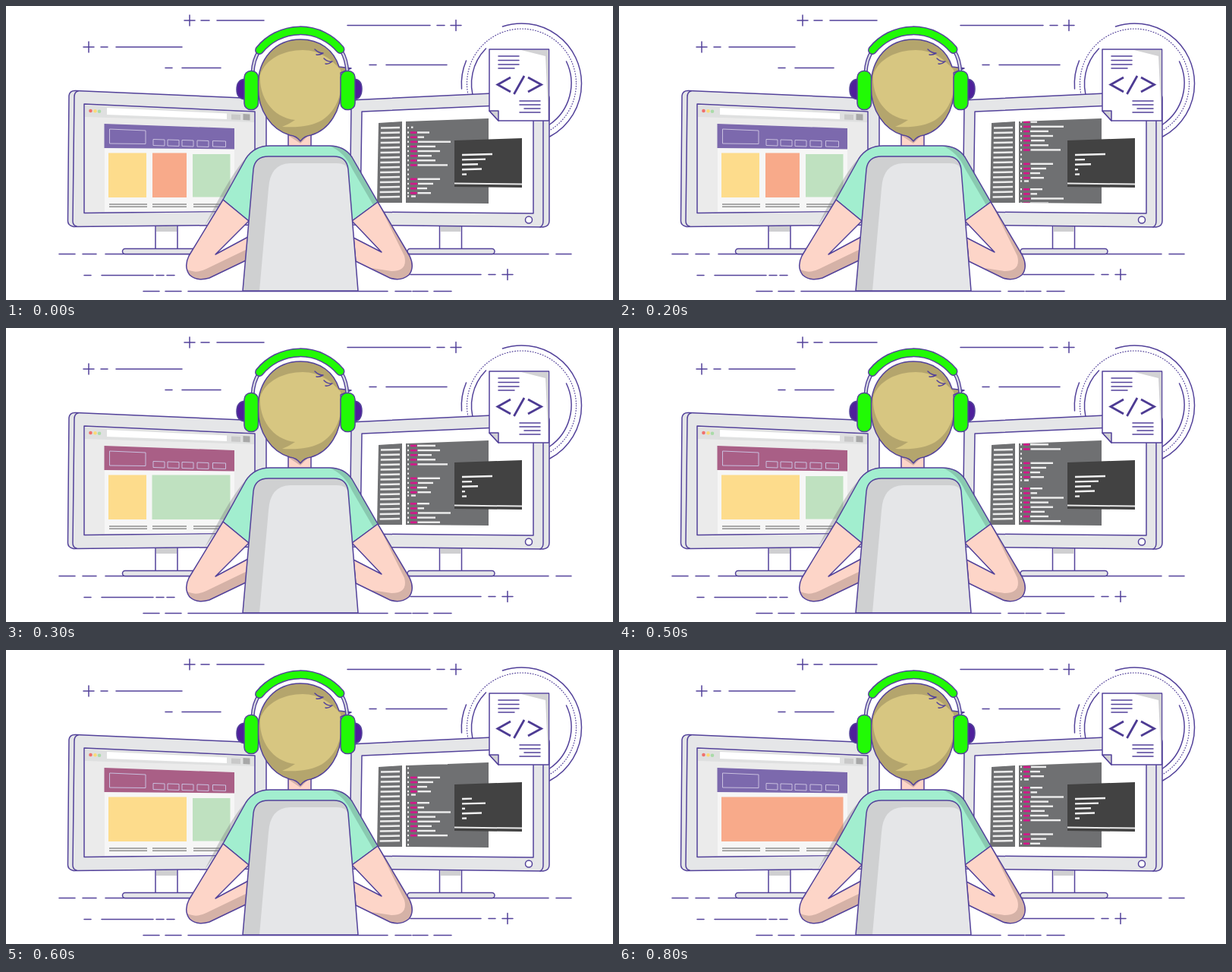
These frames come from a looping animation (800x387 px, 0.9 s). An HTML page:

```html
<!DOCTYPE html>
<html lang="en">
<head>
<meta charset="utf-8">
<title>Developer at work</title>
<style>
html, body { margin: 0; width: 100%; height: 100%; overflow: hidden; background: #fff; }
svg { display: block; width: 100%; height: 100%; }
.ink { stroke: #53429a; stroke-width: 1.5; stroke-linejoin: round; stroke-linecap: round; }
.none { fill: none; }
.metal { fill: #e5e6e8; }
.white { fill: #fff; }
.shadow { fill: #cfcfd1; }
.skin { fill: #fdd5c8; }
.skinShade { fill: #d5b2a7; }
.shirt { fill: #a2eecf; }
.shirtShade { fill: #89c9b0; }
.green { fill: #21fa05; }
</style>
</head>
<body>
<svg viewBox="0 0 800 387">
  <defs>
    <clipPath id="codeClip"><path d="M527 152L636 148V260L527 259Z"/></clipPath>
    <clipPath id="headClip"><path id="head" d="M332 106C332 68 356 44 388 44C414 44 432 58 439 80L455 82L441 88Q442 97 442 106C442 138 426 163 402 170Q393 171 388 178Q383 171 374 170C350 163 332 138 332 106Z"/></clipPath>
    <clipPath id="leftArm"><path id="armL" d="M286 255L241 329Q234 343 242 354Q252 363 268 358L316 335L319 304L276 327L320 283Z"/></clipPath>
    <clipPath id="rightArm"><path id="armR" d="M490 258L532 329Q539 344 531 354Q520 363 506 358L461 336L458 305L495 324L456 283Z"/></clipPath>
  </defs>

  <!-- Backdrop strokes -->
  <path class="ink none" d="
    M235 19h14M242 12v14M257 19h11M278 19h62
    M102 54h14M109 47v14M125 54h9M145 54h87
    M210 81.500h9M232 81.500h51
    M450 25.500h109M568 25.500h10M586 25.500h14M593 18.500v14
    M479 77.500h9M501 77.500h80
    M70 326.500h21M101 326.500h18M131 326.500h584M725 326.500h20
    M103 354.500h9M126 354.500h68M198 354.500h10M212 354.500h10
    M533 353.500h93M636 353.500h9M654 353.500h14M661 346.500v14
    M181 375.500h21M210 375.500h21M240 375.500h263M513 375.500h21M536 375.500h20M564 375.500h23"/>
  <g class="ink none" transform="translate(.5 1)">
    <path d="M654 26A79 79 0 0 1 758 101A79 79 0 0 1 716 171M600 108A79 79 0 0 1 606 71"/>
    <path d="M617 124A66 66 0 0 1 632 55M738 72A66 66 0 0 1 716 155"/>
    <circle cx="679" cy="101" r="72" stroke-dasharray=".8 2.600" style="stroke-width:1.2"/>
  </g>

  <!-- Left monitor -->
  <g class="ink">
    <path class="white" d="M197 288h29v32h-29Z"/>
    <path class="shadow" stroke="none" d="M198 290h27v7h-27Z"/>
    <rect class="metal" x="153.500" y="319.500" width="101" height="7" rx="3.500"/>
    <path class="metal" d="M92 111.500L335 122Q343 123 343 130V288L89 290.500Q81.500 289 81.500 283L83 118Q84 111 92 111.500Z"/>
    <path class="none" d="M95 112Q90 113 90 120L88 283Q88 289 93 290"/>
    <path fill="#ebebeb" d="M103 129L328 139V270L103 272.500Z"/>
  </g>
  <path fill="#dfe0e0" d="M104 131L327 140V153L104 146Z"/>
  <path fill="#fff" d="M133 134L291 141.500V149L133 143Z"/>
  <path fill="#c9c9c9" d="M297 142.500l12 .5v7l-12-.5Z"/>
  <path fill="#a7a7a7" d="M312.500 142l9 .5v8l-9-.5Z"/>
  <circle cx="111.500" cy="138" r="2.300" fill="#f0706c"/>
  <circle cx="117.500" cy="138.300" r="2.300" fill="#fadb78"/>
  <circle cx="123" cy="138.700" r="2.300" fill="#a9dba8"/>
  <path fill="#f6f6f6" d="M130 155L301 161V270L130 271Z"/>
  <path id="header" d="M129.500 155L301 161V188.500L129.500 187Z"/>
  <path fill="none" stroke="#c9c0df" d="M136.500 162L184 164V181.500L136.500 181Z
    M194 175.500l15 .5v8l-15-.5ZM213 176l15 .5v8l-15-.5ZM232 176.500l15 .5v8l-15-.5ZM252 177l15 .5v8l-15-.5ZM272.500 177.500l17 .5v7.500l-17-.5Z"/>
  <g id="cards"></g>
  <path stroke="#8f8f8f" stroke-width="1.500" d="M136 261h50M136 264.300h50M193 261h45M193 264.300h45M247 261h40M247 264.300h40"/>

  <!-- Right monitor -->
  <g class="ink">
    <path class="white" d="M571.500 288h29v32h-29Z"/>
    <path class="shadow" stroke="none" d="M572.500 290h27v7h-27Z"/>
    <rect class="metal" x="529" y="319.500" width="115" height="7" rx="3.500"/>
    <path class="metal" d="M453 288L455 131Q456 124 463 123.500L705 112Q716 113 716 122V283Q716 290 708 291Z"/>
    <path class="none" d="M703 113Q708 114 708 122V283Q708 289 704 291"/>
    <path class="white" d="M469 139L695 129V273L467 271Z"/>
    <circle class="white" cx="689" cy="281.500" r="4.500"/>
  </g>
  <path fill="#6f7072" d="M491 154L522 152V259L489 259Z"/>
  <path id="sidebar" stroke="#ececec" stroke-width="2.500"/>
  <path fill="#6f7072" d="M527 152L636 148V260L527 259Z"/>
  <g clip-path="url(#codeClip)"><g id="code"></g></g>
  <path fill="#424242" d="M591 177L680 174V239L591 238Z"/>
  <path stroke="#e8e8e8" stroke-width="2" d="M591 233.500L680 234.500"/>
  <path id="terminal" stroke="#f0f0f0" stroke-width="2.400"/>

  <!-- Document -->
  <path class="ink white" d="M637 57H715.500V151H649L637 138Z"/>
  <path fill="#d2d2d4" d="M679 58L715 58V150L711 66Q695 62 679 58Z"/>
  <path class="ink" fill="#d2d2d4" d="M637 138H649V151Z"/>
  <path class="ink none" d="M649 66h27M649 71.500h27M649 77h27M649 82h21M677 125h27M677 130h27M683 135h21M677 140h27"/>
  <path fill="none" stroke="#4d3b93" stroke-width="2.800" d="M665 94L648 103.500L665 113M683 92L669.500 116M688 94L705.500 103.500L688 113"/>

  <!-- Person -->
  <path fill="#77777b" opacity=".35" d="M318 198Q298 218 262 289L286 255Z"/>
  <path class="skin ink" d="M372 160H402V188H372Z"/>
  <path class="skinShade" d="M373 162H401V168L388 181L373 171Z"/>
  <path class="shirt" d="M286 255L316 201Q327 184 348 184H426Q446 184 456 199L490 258L456 283L440 300H330L320 283Z"/>
  <path class="shirtShade" d="M426 184Q446 184 456 199L490 258L484 262L456 214Q446 192 426 184Z"/>
  <path class="ink none" d="M286 255L316 201Q327 184 348 184H426Q446 184 456 199L490 258L456 283M320 283L286 255"/>
  <use href="#armL" class="skin"/>
  <path class="skinShade" clip-path="url(#leftArm)" d="M232 342Q246 355 264 346L318 320V340L262 366H230Z"/>
  <use href="#armL" class="ink none"/>
  <use href="#armR" class="skin"/>
  <path class="skinShade" clip-path="url(#rightArm)" d="M545 330L490 258L525 329Q530 349 508 349L482 345L510 366H545Z"/>
  <use href="#armR" class="ink none"/>

  <path fill="#cfd0d1" d="M312 375L326 215Q328 198 346 198H432Q449 198 451 215L464 375Z"/>
  <path class="metal" d="M334 375L346 240Q348 208 374 207H436Q449 207 451 216L464 375Z"/>
  <path class="ink none" d="M312 375L326 215Q328 198 346 198H432Q449 198 451 215L464 375Z"/>

  <use href="#head" fill="#b4a56d"/>
  <path fill="#d7c681" clip-path="url(#headClip)" d="M335 91C342 69 367 58 391 58C413 58 429 70 441 84C446 112 436 138 417 150Q399 161 364 159Q374 155 381 150C351 147 333 119 335 91Z"/>
  <use href="#head" class="ink none"/>
  <path class="ink none" d="M407 57Q412 62 418 62Q413 65 409 64M419 69Q424 74 430 73Q425 77 421 76"/>

  <!-- Headphones -->
  <g fill="none" stroke-linecap="round">
    <path stroke="#53429a" stroke-width="5" d="M334 59Q326 70 325 88M442 59Q449 70 450 88"/>
    <path stroke="#d8d9e2" stroke-width="2.200" d="M334 59Q326 70 325 88M442 59Q449 70 450 88"/>
    <path id="band" stroke="#53429a" stroke-width="12" d="M334 58A69 69 0 0 1 440.500 57"/>
    <path stroke="#21fa05" stroke-width="9" d="M334 58A69 69 0 0 1 440.500 57"/>
  </g>
  <path fill="#4f209b" class="ink" d="M315 96Q304 97 304 110Q304 122 315 123ZM459 96Q469 97 469 109Q469 122 459 123Z"/>
  <rect class="green ink" x="314" y="85.500" width="18.500" height="51" rx="8.500"/>
  <rect class="green ink" x="441" y="85.500" width="19" height="51" rx="8.500"/>
</svg>
<script>
const STEP = 100, STEPS = 9;
const SCROLL = 10, BLOCK = 94.7, ROW = 6.13, TOP = 166.5;
const YELLOW = '#fddc8c', CORAL = '#f8aa8a', MINT = '#bfe1c0';
const PURPLE = '#7c69ad', PLUM = '#a95f86';

const $ = id => document.getElementById(id);
const rect = (x, y, w, h, fill) => `<rect x="${x}" y="${y}" width="${w}" height="${h}" fill="${fill}"/>`;

// Each layout: header colour, then cards as [left, right, colour]
const layouts = [
  [PURPLE, [135, 185, YELLOW], [193, 238, CORAL], [246, 295.5, MINT]],
  [PLUM, [135, 185, YELLOW], [192.5, 295.5, MINT]],
  [PLUM, [135, 238, YELLOW], [246, 295.5, MINT]],
  [PURPLE, [135, 295.5, CORAL]],
];
const layoutAt = [0, 0, 0, 1, 1, 2, 2, 3, 3];

// Right ends of the terminal lines
const prompts = [
  [641, 632, 622, 627, 607],
  [641, 614, 622, 605, 607],
  [614, 632, 605, 627, 607],
];
const promptAt = [0, 0, 1, 1, 0, 0, 2, 2, 0];

// Right ends of the code lines; 0 is a blank line
const codeEnds = [558, 551, 586, 566, 572, 561, 566, 582, 0, 0, 572, 563, 555, 560];

function codeBlock(top) {
  const rows = codeEnds.map((end, i) => {
    const y = top + i * ROW - 1.2;
    const split = 541 + i % 3 / 2;
    return rect(529, y, 2, 2.4, '#eee') + (end
      ? rect(533, y, split - 533, 2.6, '#d3168a') + rect(split + 1, y, end - split - 1, 2.4, '#eee')
      : '');
  });
  const shortY = top + 84 - 1.2;
  return rows.join('') + rect(529, shortY, 2, 2.4, '#eee') + rect(534, shortY, 6, 2.4, '#eee');
}

$('code').innerHTML = rect(529, 159, 2, 2.4, '#eee') + rect(534, 158.5, 2.5, 2.4, '#eee')
  + codeBlock(TOP) + codeBlock(TOP + BLOCK);
$('sidebar').setAttribute('d', Array.from({ length: 15 }, (_, i) =>
  `M${494 - i * .1} ${160.5 + i * 6.5}L519 ${160 + i * 6.5}`).join(''));

let shown = -1;
function draw(now) {
  const step = Math.floor(now / STEP) % STEPS;
  if (step !== shown) {
    shown = step;
    const [header, ...cards] = layouts[layoutAt[step]];
    $('header').setAttribute('fill', header);
    $('cards').innerHTML = cards.map(([left, right, fill]) =>
      rect(left, left > 240 ? 195 : 193.5, right - left, left > 240 ? 56.5 : 58.5, fill)).join('');
    $('code').setAttribute('transform', `translate(0 ${-SCROLL * step})`);
    $('terminal').setAttribute('d', prompts[promptAt[step]].map((end, i) =>
      `M601 ${196 + i * 6.4}L${end} ${196 + i * 6.4 - (end - 601) * .025}`).join(''));
  }
  requestAnimationFrame(draw);
}
draw(performance.now());
</script>
</body>
</html>
```
